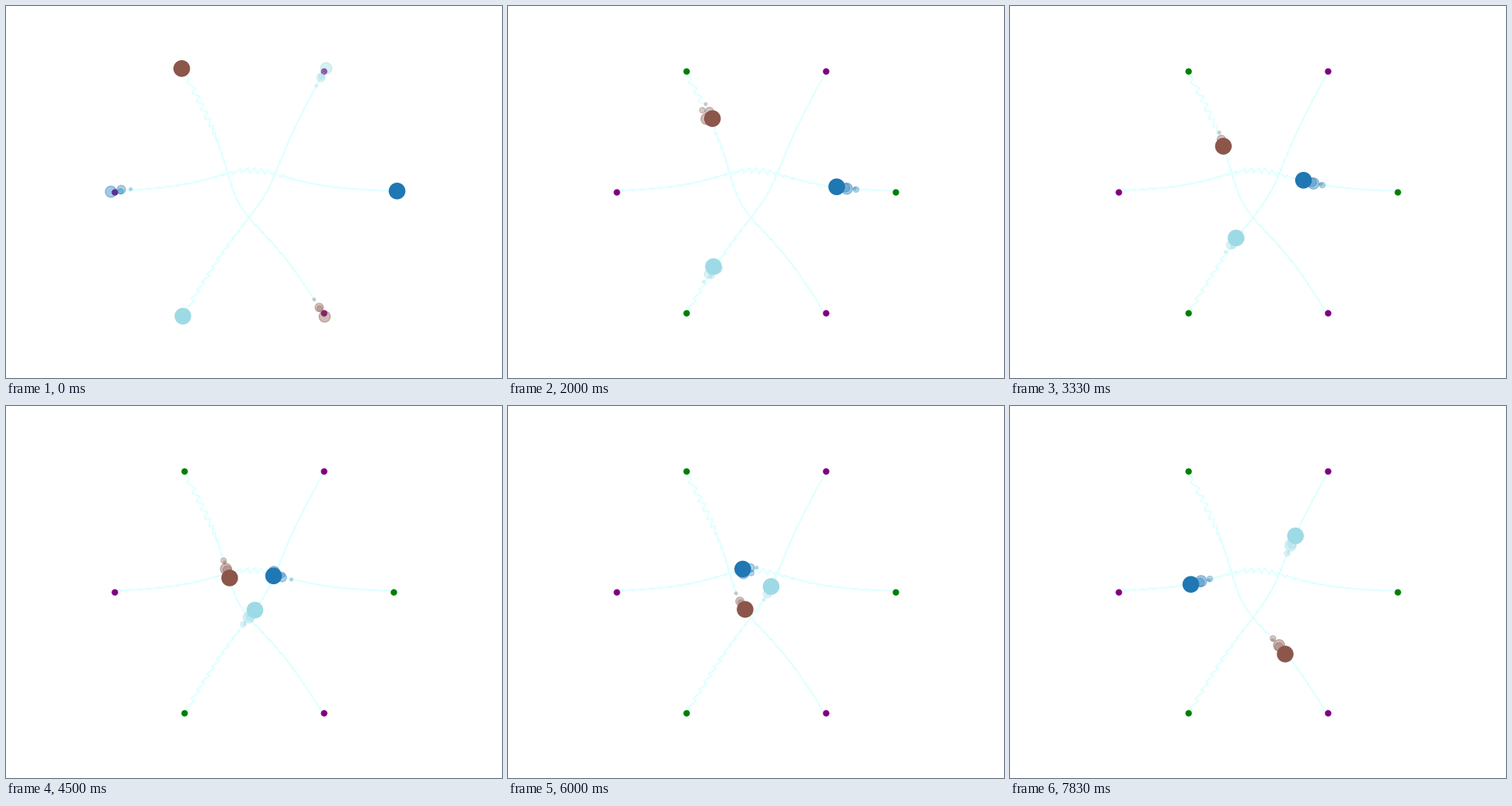
These frames come from a looping animation (640x480 px, 8 s). A matplotlib script:

```python
import numpy as np
import matplotlib.pyplot as plt
from matplotlib.animation import FuncAnimation

W, H, DPI = 640, 480, 100
FRAMES, INTERVAL = 48, 166
STEPS, TRAIL = 64, 4
RING = 180        # radius of the start and goal dots
SWAY = 3.8        # half the back-and-forth of each step
COLORS = ["#1f77b4", "#8c564b", "#9edae5"]

# start angle, sideways detour, delay at the centre,
# sway heading at first and at last, step at which it turns
ROBOTS = [
    (0, 28, 0, 168, 20, 30),
    (120, 24, 12, -140, 0, 12),
    (240, 14, 0, -40, 0, 23),
]


def polar(radius, degrees):
    a = np.radians(degrees)
    return radius * np.cos(a), radius * np.sin(a)


def ring(degrees):
    x, y = polar(RING, np.array(degrees))
    return W / 2 + x, H / 2 - y


def walk(start, detour, delay, first, last, turn):
    """Cross the ring, bending round the centre and swaying every step."""
    t = np.arange(STEPS)
    ahead = np.interp(t, [0, 5, 11, 26, 35, 46, 63],
                      [184.6, 149, 113.5, 28, -14, -77, -181])
    ahead += delay * np.exp(-((t - 26) / 9) ** 2)
    side = detour / np.cosh((ahead + 5) / 50)

    heading = first + (last - first) / (1 + np.exp((turn - t) / 4))
    swing = SWAY * np.minimum(t / 3, 1) * (-1.0) ** t
    da, ds = polar(swing, heading)
    ahead, side = ahead + da, side + ds

    ux, uy = polar(1, start)
    return np.column_stack([W / 2 + ahead * ux - side * uy,
                            H / 2 - ahead * uy - side * ux])


paths = np.array([walk(*robot) for robot in ROBOTS])

fig = plt.figure(figsize=(W / DPI, H / DPI), dpi=DPI, facecolor="white")
ax = fig.add_axes([0, 0, 1, 1])
ax.set_xlim(0, W)
ax.set_ylim(H, 0)
ax.axis("off")

for path in paths:
    ax.plot(*path.T, color="lightcyan", lw=1.5, zorder=1)
ax.scatter(*ring([0, 120, 240]), s=25, c="green", zorder=2)
ax.scatter(*ring([180, 300, 60]), s=25, c="purple", zorder=2)

ages = range(TRAIL, 0, -1)
ghosts = [ax.scatter(*paths[:, -k].T, s=6.8 * (5 - k) ** 2, c=COLORS,
                     alpha=0.45 - 0.05 * k, zorder=3) for k in ages]
robots = ax.scatter(*paths[:, 0].T, s=210, c=COLORS, zorder=4)


def update(n):
    # Early steps wrap round, so the trail starts at the goals
    for k, ghost in zip(ages, ghosts):
        ghost.set_offsets(paths[:, n - k])
    robots.set_offsets(paths[:, n])
    return [*ghosts, robots]


anim = FuncAnimation(fig, update, frames=FRAMES, interval=INTERVAL,
                     repeat=True, repeat_delay=0)
plt.show()
```
